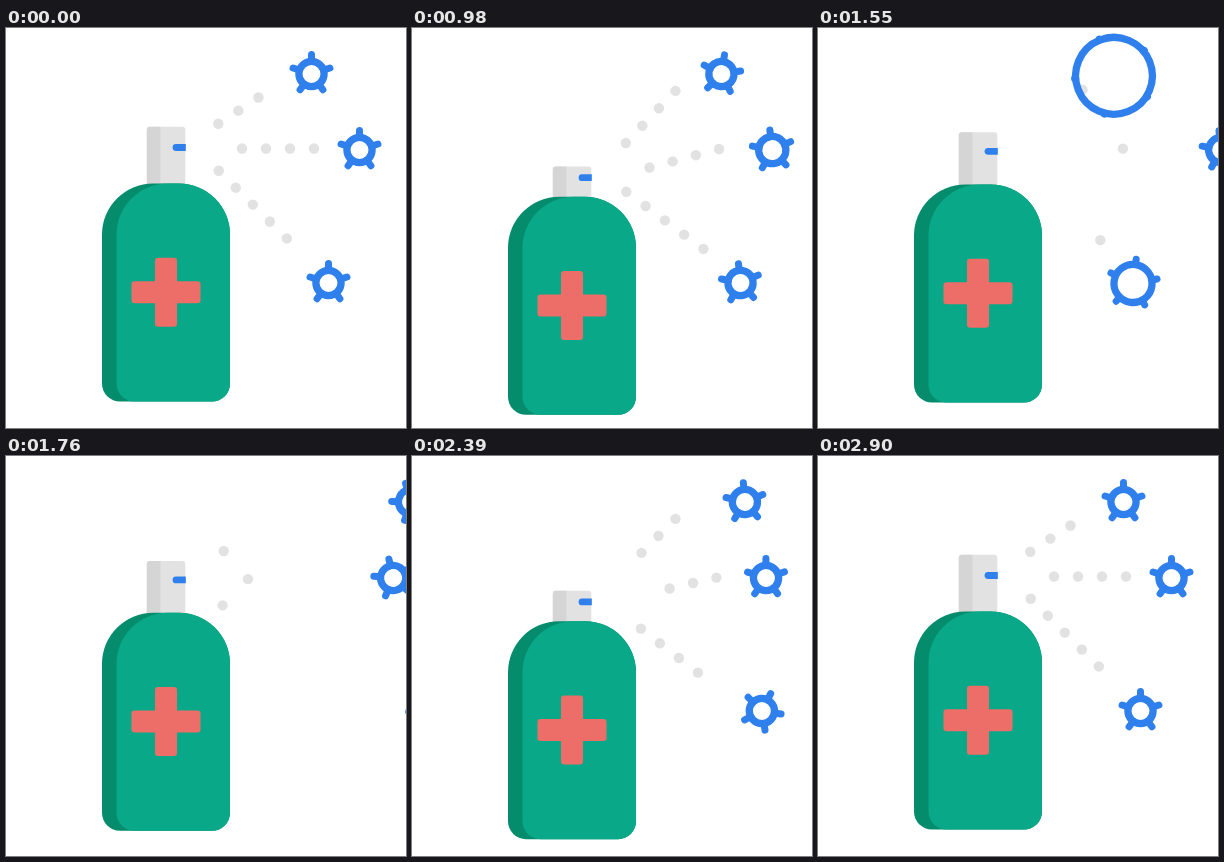
These frames come from a looping animation (400 px wide and 400 px high, 2.93 s). An HTML page with a canvas:

```html
<!DOCTYPE html>
<html lang="en">
<head>
<meta charset="utf-8">
<title>Disinfectant spray</title>
<style>
  html, body { margin: 0; width: 100%; height: 100%; overflow: hidden; background: #fff; }
  canvas { display: block; width: 100vw; height: 100vh; }
</style>
</head>
<body>
<canvas id="stage" width="400" height="400"></canvas>
<script>
const ctx = document.getElementById('stage').getContext('2d');
const LOOP = 2930, HOLD = 500, STEP = 30, GAP = 24;
const BLUE = '#2f80ed', GREY = '#e2e2e2';

const mod = (a, n) => ((a % n) + n) % n;
const sine = u => (1 - Math.cos(Math.PI * u)) / 2;
const linear = u => u;

// Value at k along [time, value] pairs.
function tween(k, keys, ease) {
  if (k <= keys[0][0]) return keys[0][1];
  for (let i = 1; i < keys.length; i++) {
    const [a, from] = keys[i - 1], [b, to] = keys[i];
    if (k < b) return from + (to - from) * ease((k - a) / (b - a));
  }
  return keys[keys.length - 1][1];
}

// Pump depth, 0 to 1: quick press, slower release, twice per loop.
function pump(k) {
  const p = mod(k, 40);
  return p < 15 ? sine(Math.pow(p / 15, 0.8))
                : 1 - sine(Math.pow((p - 15) / 25, 0.92));
}

function box(x, y, w, h, r, color) {
  ctx.fillStyle = color;
  ctx.beginPath();
  ctx.roundRect(x, y, w, h, r);
  ctx.fill();
}

function drawBottle(top, capH, nozzleY) {
  box(140.8, top - capH, 38.5, capH + 1, [3, 3, 0, 0], GREY);
  box(140.8, top - capH, 13.6, capH + 1, [3, 0, 0, 0], '#d5d5d5');
  box(166.6, nozzleY - 3.4, 13.2, 6.8, [3.4, 0, 0, 3.4], BLUE);
  box(96, top, 128, 218, [51, 51, 18, 18], '#058c6c');
  box(110.5, top, 113.5, 218, [51, 51, 18, 18], '#08a888');
  box(125.5, top + 97.7, 69, 22, 3, '#ed6e68');
  box(149, top + 74.2, 22, 69, 3, '#ed6e68');
}

// end: far point; from: near point at rest; phase: first dot's distance from the end
const sprays = [
  { end: [265, 61.3], from: [189, 111], len: 77, phase: 15, pull: 11.3, cut: 54.4 },
  { end: [309, 120.5], from: [196, 120.5], len: 86, phase: 1, pull: 1, cut: 60 },
  { end: [291.5, 221], from: [172, 102.3], len: 116, phase: 15, pull: -15, cut: 88 }
];

function drawSpray(s, k, press, drop) {
  const second = k >= 48;
  const keys = second
    ? [[56, 0], [63, 24], [68, s.cut], [72, s.len], [72, 0]]
    : [[16, 0], [23, 24], [35, s.cut], [40, s.len], [40, 0]];
  const trim = tween(k, keys, linear);
  const refill = k - (second ? 72 : 40);
  const front = refill >= 0 ? Math.min(1, refill / 8) : 1;
  const [ex, ey] = s.end;
  const dx = s.from[0] - ex, dy = s.from[1] + drop - ey;
  const size = Math.hypot(dx, dy);
  ctx.fillStyle = GREY;
  let d = mod(s.phase - 3 * k + s.pull * press - trim, GAP);
  for (; d <= s.len - trim; d += GAP) {
    if (d < s.len * (1 - front)) continue;
    ctx.beginPath();
    ctx.arc(ex + dx * d / size, ey + dy * d / size, 5.2, 0, 7);
    ctx.fill();
  }
}

function drawVirus(x, y, turn, grow) {
  const r = 12.6 + grow, tip = r + 6.8 - grow * 0.22;
  ctx.save();
  ctx.translate(x, y);
  ctx.rotate(turn * Math.PI / 180);
  ctx.strokeStyle = BLUE;
  ctx.lineCap = 'round';
  ctx.lineWidth = 7.3;
  ctx.beginPath();
  ctx.arc(0, 0, r, 0, 7);
  ctx.stroke();
  ctx.lineWidth = 7;
  for (let i = 0; i < 5; i++) {
    ctx.rotate(Math.PI * 2 / 5);
    ctx.beginPath();
    ctx.moveTo(0, -r);
    ctx.lineTo(0, -tip);
    ctx.stroke();
  }
  ctx.restore();
}

const viruses = [
  { x: 305.5, y: 46, drift: [[0, 0], [12, 5], [35, -9.5]], spin: 2.3, pop: 25,
    far: 130, enter: [24, 80], roll: d => -0.165 * d },
  { x: 353.5, y: 122, drift: [[0, 0], [17, 6.8], [31, -7]], spin: -1, pop: 14,
    far: 75, enter: [15, 65.7], roll: d => -13 * Math.sin(Math.PI * d / 60) },
  { x: 322.5, y: 255, drift: [[0, 0], [16, 6], [35, -7.5]], spin: -1, pop: 30,
    far: 130, enter: [24, 80], roll: d => -1.65 * d }
];

function moveVirus(v, k) {
  if (k <= v.pop + 11) {
    const d = tween(k, v.drift, sine);
    const grow = 0.258 * Math.pow(Math.max(0, k - v.pop), 2);
    drawVirus(v.x + d, v.y + grow * 0.07, d * v.spin, grow);
  }
  if (k >= v.enter[0]) {
    const d = tween(k, [[v.enter[0], v.far], [v.enter[1], 0]], sine);
    drawVirus(v.x + d, v.y, v.roll(d), 0);
  }
}

function draw(now) {
  const t = mod(now, LOOP);
  const k = Math.max(0, Math.floor((t - HOLD) / STEP));
  const press = pump(k);
  const top = 155.5 + 13.4 * press;
  const capH = 56.7 - 26.5 * Math.sin(Math.PI / 2 * Math.min(1, 1.27 * press));
  const nozzleY = top - capH * 0.635;
  ctx.fillStyle = '#fff';
  ctx.fillRect(0, 0, 400, 400);
  for (const s of sprays) drawSpray(s, k, press, nozzleY - 119.5);
  for (const v of viruses) moveVirus(v, k);
  drawBottle(top, capH, nozzleY);
}

function tick() {
  draw(performance.now());
  requestAnimationFrame(tick);
}
tick();
</script>
</body>
</html>
```
